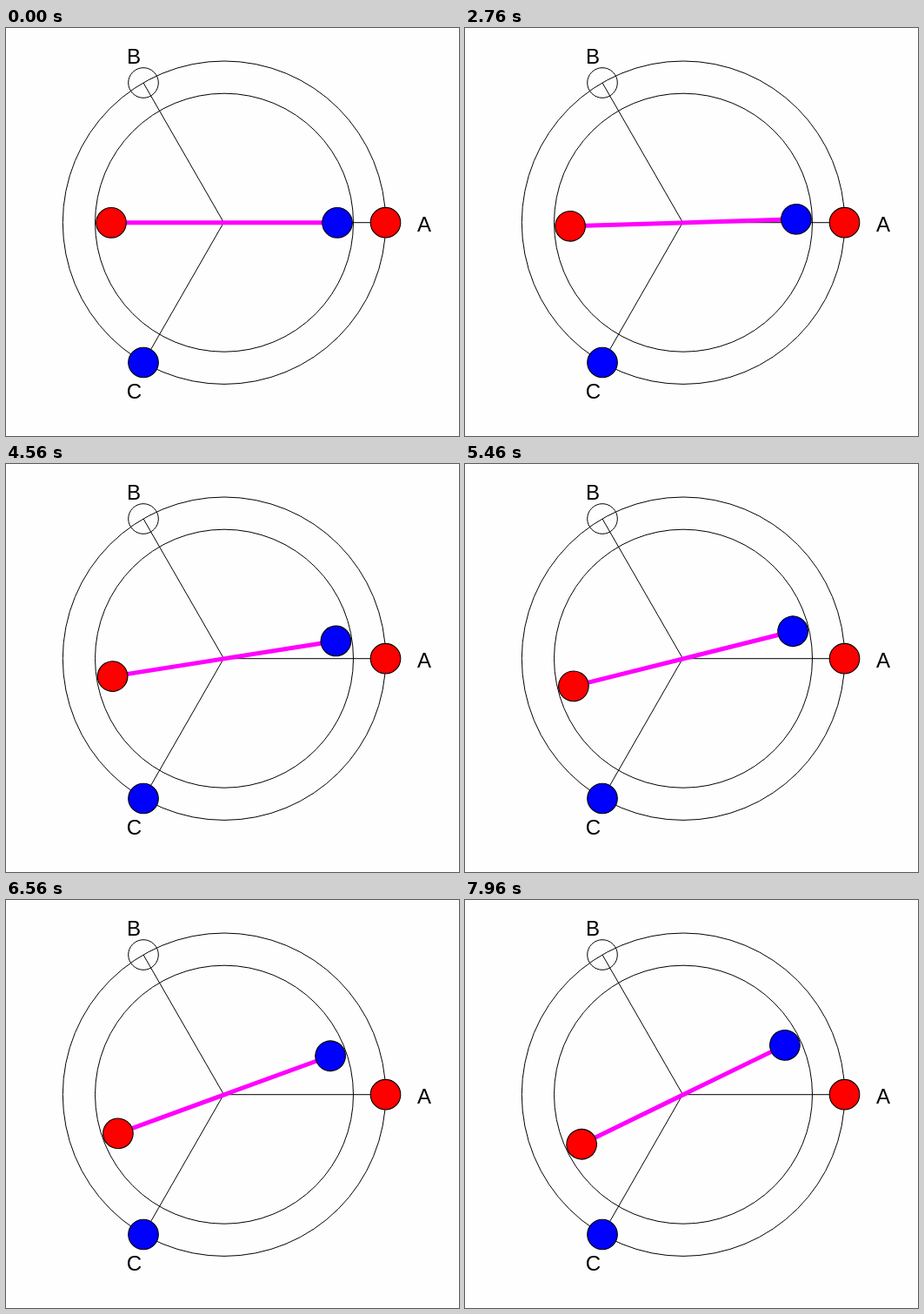
Write an HTML page that moves like this. It is 521 by 469 pixels and loops after 8000 ms.

```html
<!DOCTYPE html>
<html lang="en">
<head>
<meta charset="utf-8">
<title>Rotor and three coils</title>
<style>
  html, body { margin: 0; width: 100%; height: 100%; overflow: hidden; background: #fefefe; }
  svg { display: block; width: 521px; height: 469px; }
  .thin { fill: none; stroke: #000; stroke-width: 1; }
  .ball { stroke: #000; stroke-width: 1.1; }
  .red { fill: #f00; }
  .blue { fill: #00f; }
  .bar { stroke: #f0f; stroke-width: 5; }
  text { font: 24px "Liberation Sans", Arial, sans-serif; text-anchor: middle; }
</style>
</head>
<body>
<svg viewBox="0 0 521 469">
  <g class="thin">
    <circle cx="251" cy="223.7" r="185.7"/>
    <circle cx="251" cy="223.7" r="148.5"/>
    <circle cx="158" cy="63" r="17.3"/>
    <path d="M158 63 L250.4 223.5 L158 384.5 M250.4 223.7 H436.5"/>
  </g>
  <circle class="ball red" cx="436.5" cy="223.7" r="17.3"/>
  <circle class="ball blue" cx="158" cy="384.5" r="17.3"/>
  <g id="rotor">
    <path class="bar" d="M121 223.8 H381"/>
    <circle class="ball red" cx="121" cy="223.8" r="17.3"/>
    <circle class="ball blue" cx="381" cy="223.8" r="17.3"/>
  </g>
  <text x="481" y="233.5">A</text>
  <text x="147" y="41">B</text>
  <text x="147.5" y="426">C</text>
</svg>
<script>
  const LOOP = 8000;
  const rotor = document.getElementById('rotor');

  // [ms, degrees]: slow start, fastest near the middle, then easing off
  const keys = [[1100, 0], [1900, 0.35], [2730, 1.7], [3600, 4.4],
                [4560, 8.98], [5460, 14.04], [6560, 20.04], [7960, 25.97]];
  const last = keys.length - 1;
  const END_SLOPE = 0.0034;

  const rise = i => (keys[i + 1][1] - keys[i][1]) / (keys[i + 1][0] - keys[i][0]);

  function slope(i) {
    if (i === 0) return 0;
    if (i === last) return END_SLOPE;
    const a = keys[i][0] - keys[i - 1][0], b = keys[i + 1][0] - keys[i][0];
    return (rise(i - 1) * b + rise(i) * a) / (a + b);
  }

  // Smooth cubic through the keys, held still outside them
  function angle(t) {
    if (t <= keys[0][0]) return 0;
    if (t >= keys[last][0]) return keys[last][1];
    let i = 0;
    while (t > keys[i + 1][0]) i++;
    const [t0, a0] = keys[i], [t1, a1] = keys[i + 1];
    const h = t1 - t0, u = (t - t0) / h, v = 1 - u;
    return a0 * v * v * (1 + 2 * u) + a1 * u * u * (3 - 2 * u)
         + h * u * v * (slope(i) * v - slope(i + 1) * u);
  }

  const start = performance.now();
  function draw() {
    const t = (performance.now() - start) % LOOP;
    rotor.setAttribute('transform', `rotate(${-angle(t)} 251 223.8)`);
    requestAnimationFrame(draw);
  }
  draw();
</script>
</body>
</html>
```
